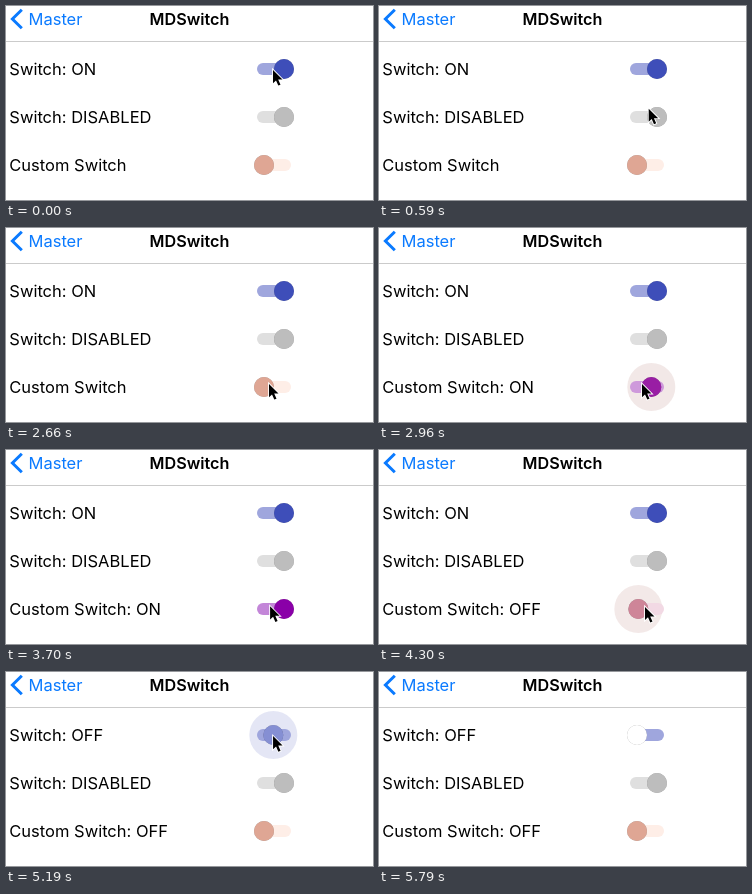
An HTML page that plays this animation: 367 by 194 pixels, repeating every 6.09 s.

```html
<!DOCTYPE html>
<html lang="en">
<head>
<meta charset="utf-8">
<title>MDSwitch</title>
<style>
  html, body { margin: 0; width: 100%; height: 100%; overflow: hidden; background: #fff; }
  svg { display: block; width: 367px; height: 194px; }
  text { font: 16.5px Inter, "Liberation Sans", sans-serif; fill: #000; }
  .title { font-size: 16.2px; font-weight: 600; text-anchor: middle; }
  .back { fill: #0a7aff; }
  .thumb { filter: drop-shadow(0 .7px .7px rgba(0, 0, 0, .4)); }
</style>
</head>
<body>
<svg viewBox="0 0 367 194">
  <path d="M15.8 3.7 6.4 13l9.4 9.3" fill="none" stroke="#0a7aff" stroke-width="3"/>
  <text class="back" x="22.5" y="19">Master</text>
  <text class="title" x="183.5" y="19">MDSwitch</text>
  <path d="M0 35.5H367" stroke="#cbcbcb"/>
  <g id="rows"></g>
  <path id="cursor" d="M0 0V13.2l3-2.8 2.3 5.2 2.2-.9-2.3-5.2h4.3Z" fill="#000" stroke="#fff" stroke-width="1.8" paint-order="stroke"/>
</svg>
<script>
const LOOP = 6090;
const FRAME = LOOP / 41;
const START = { x: 267, y: 64 };
const RIPPLE = { radius: 24, grow: 150, linger: 200, fade: 220 };
const SLIDE = 280;

// the pointer eases to each stop
const moves = [
  { from: 0, to: 740, x: 270, y: 107 },
  { from: 1340, to: 1630, x: 270, y: 110 },
  { from: 2070, to: 2660, x: 263, y: 156 },
  { from: 3410, to: 4150, x: 266, y: 157 },
  { from: 4300, to: 4740, ...START },
  { from: 5190, to: 5790, x: 355, y: 215 }
];

// colour pairs run from off to on
const switches = [
  {
    y: 63, on: 1, label: "Switch: ON", thumb: ["#fff", "#3e4eb9"], track: ["#9fa6dd", "#9fa6dd"],
    ripple: "#7882cd",
    taps: [{ press: 4880, release: 5110, on: 0, label: "Switch: OFF" }]
  },
  {
    y: 111, on: 1, label: "Switch: DISABLED", thumb: ["#bdbdbd", "#bdbdbd"], track: ["#dfdfdf", "#dfdfdf"],
    ripple: "#bdbdbd", taps: []
  },
  {
    y: 159, on: 0, label: "Custom Switch", thumb: ["#dfa694", "#8a00a8"], track: ["#feeee7", "#c386d8"],
    ripple: "#be8c87",
    taps: [
      { press: 2740, release: 2840, on: 1, label: "Custom Switch: ON" },
      { press: 3900, release: 4100, on: 0, label: "Custom Switch: OFF" }
    ]
  }
];

const rows = document.getElementById("rows");
const cursor = document.getElementById("cursor");

const span = (time, from, length) => Math.min(1, Math.max(0, (time - from) / length));
const smooth = t => t * t * (3 - 2 * t);
const easeOut = t => 1 - (1 - t) ** 2;
const lerp = (a, b, t) => a + (b - a) * t;
const mix = ([off, on], t) => `color-mix(in srgb, ${on} ${t * 100}%, ${off})`;

function set(node, attrs) {
  for (const name in attrs) node.setAttribute(name, attrs[name]);
}

function add(tag, attrs) {
  const node = document.createElementNS("http://www.w3.org/2000/svg", tag);
  set(node, attrs);
  rows.append(node);
  return node;
}

for (const item of switches) {
  const { y } = item;
  item.nodes = {
    label: add("text", { x: 3.3, y: y + 6 }),
    ripple: add("circle", { cy: y, fill: item.ripple }),
    track: add("rect", { x: 251, y: y - 6, width: 34, height: 12, rx: 6 }),
    thumb: add("circle", { class: "thumb", cy: y, r: 10 })
  };
}

function drawSwitch({ nodes, on, label, thumb, track, taps }, time) {
  let radius = 0, strength = 0;
  for (const tap of taps) {
    if (time < tap.press) break;
    on = lerp(on, tap.on, easeOut(span(time, tap.release, SLIDE)));
    radius = RIPPLE.radius * easeOut(span(time, tap.press, RIPPLE.grow));
    strength = 1 - span(time, tap.release + RIPPLE.linger, RIPPLE.fade);
    if (time >= tap.release) label = tap.label;
  }
  const cx = lerp(258, 278, on);
  const tint = on ** .6; // colour trails the thumb's travel
  nodes.label.textContent = label;
  set(nodes.ripple, { cx, r: radius, opacity: strength * .2 });
  nodes.track.style.fill = mix(track, tint);
  set(nodes.thumb, { cx });
  nodes.thumb.style.fill = mix(thumb, tint);
}

function drawCursor(time) {
  let { x, y } = START;
  for (const move of moves) {
    const t = smooth(span(time, move.from, move.to - move.from));
    x = lerp(x, move.x, t);
    y = lerp(y, move.y, t);
  }
  set(cursor, { transform: `translate(${x} ${y})` });
}

// motion advances in even ticks, with a small lead so each tick shows on time
function draw(now) {
  const time = Math.floor((now % LOOP + 15) / FRAME) * FRAME;
  switches.forEach(item => drawSwitch(item, time));
  drawCursor(time);
}

const start = performance.now();
function tick() {
  draw(performance.now() - start);
  requestAnimationFrame(tick);
}
tick();
</script>
</body>
</html>
```
